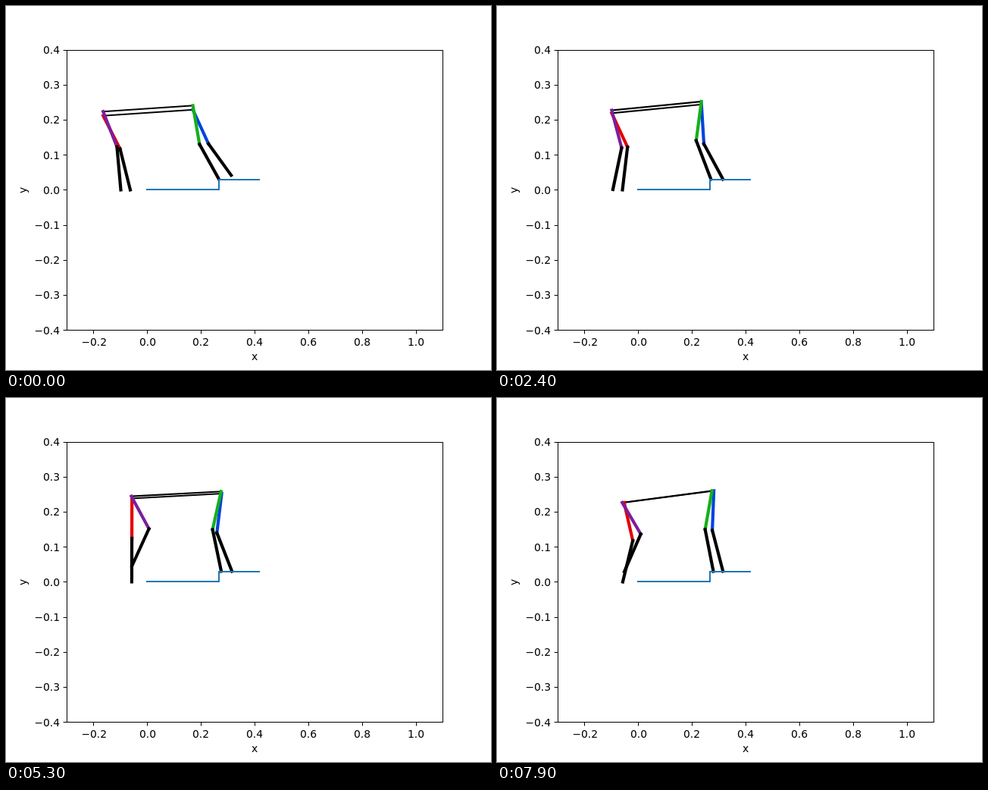
An HTML page with a canvas for the animation above (8 s loop, 640 by 480 pixels).

```html
<!DOCTYPE html>
<html lang="en">
<head>
<meta charset="utf-8">
<title>Walker on a step</title>
<style>
  html, body { margin: 0; width: 100%; height: 100%; overflow: hidden; background: #fff; }
  canvas { display: block; }
</style>
</head>
<body>
<canvas id="stage" width="640" height="480"></canvas>
<script>
const ctx = document.getElementById('stage').getContext('2d');
const LOOP = 8000, STEP = 100;
const UX = 496 / 1.4, UY = 462;            // pixels per axis unit
const FLOOR = 242.4, LEDGE = 228.5, BODY = 118.4;
const THIGH = 0.1133, SHIN = 0.1233;       // in axis units

const smooth = (a, b, t) => {
  const u = Math.min(1, Math.max(0, (t - a) / (b - a)));
  return u * u * (3 - 2 * u);
};
const label = v => (v < 0 ? '\u2212' : '') + Math.abs(v).toFixed(1);

function line(color, width, ...pts) {
  ctx.strokeStyle = color;
  ctx.lineWidth = width;
  ctx.beginPath();
  pts.forEach(p => ctx.lineTo(p[0], p[1]));
  ctx.stroke();
}

// Two-link leg: side is 1 for a knee bent to the right, -1 to the left.
function kneeAt(hip, foot, side) {
  const dx = (foot[0] - hip[0]) / UX, dy = (foot[1] - hip[1]) / UY;
  const d = Math.hypot(dx, dy), ux = dx / d, uy = dy / d;
  const along = (THIGH ** 2 - SHIN ** 2 + d * d) / (2 * d);
  const out = side * Math.sqrt(Math.max(0, THIGH ** 2 - along ** 2));
  return [hip[0] + (along * ux + out * uy) * UX, hip[1] + (along * uy - out * ux) * UY];
}

function drawLeg(color, hip, foot, side) {
  const knee = kneeAt(hip, foot, side);
  line(color, 4.17, hip, knee);
  line('#000', 4.17, knee, foot);
}

// Right-aligned number, snapped to whole pixels.
function tickText(v, right, base) {
  ctx.textAlign = 'right';
  ctx.fillText(label(v), Math.round(right + 0.25) + 0.1, Math.round(base));
}

function drawAxes() {
  ctx.fillStyle = '#000';
  ctx.font = '13.89px "DejaVu Sans", sans-serif';
  ctx.lineCap = 'butt';
  for (let i = -1; i <= 5; i++) {
    const x = 80 + (i * 0.2 + 0.3) * UX, sx = Math.round(x) + 0.5;
    line('#000', 1, [sx, 427.5], [sx, 432.4]);
    tickText(i / 5, x + ctx.measureText(label(i / 5)).width / 2, 448);
  }
  for (let i = -4; i <= 4; i++) {
    const y = FLOOR - i * 0.1 * UY, sy = Math.round(y) + 0.5;
    line('#000', 1, [75.6, sy], [80.5, sy]);
    tickText(i / 10, 70.3, y + 5.4);
  }
  ctx.textAlign = 'center';
  ctx.fillText('x', 328, 467);
  ctx.save();
  ctx.translate(27, 243);
  ctx.rotate(-Math.PI / 2);
  ctx.fillText('y', 0, 0);
  ctx.restore();
  ctx.strokeStyle = '#000';
  ctx.lineWidth = 1;
  ctx.strokeRect(80.5, 58.5, 496, 369);
}

function drawWalker(t) {
  // The body slows down as it moves on; its rear rises and sinks, its front settles.
  const x = 128.2 + t * (11.8 - 0.9 * t);
  const rearY = 139.2 - 9.7 * Math.exp(-(((t - 5.05) / 2) ** 2));
  const frontY = 121.6 + 9.7 * Math.exp(-t / 3);
  // Roll and yaw part the two sides.
  const gapX = 2.5 * (t / 7.9) ** 3;
  const gapY = (3.8 + 1.7 * Math.exp(-2 * t)) * (1 - smooth(4, 8, t));

  const purple = [x, rearY], green = [x + BODY, frontY];
  const red = [x + gapX, rearY + gapY], blue = [x + BODY + gapX, frontY + gapY];

  const landing = 5.3 * (1 - smooth(0, 0.8, t));
  const blueFoot = [298.2 - 0.2 * landing, LEDGE - landing];
  const greenFoot = [281 + 0.57 * t, LEDGE];
  const redFoot = [164 + 0.65 * Math.min(t, 3), FLOOR];
  const purpleFoot = [
    151.5 + 0.25 * Math.min(t, 4.5) ** 2 + 11.5 * smooth(4.4, 5.6, t),
    FLOOR - 24 * smooth(2.2, 4.7, t) + 10.5 * smooth(4.6, 6.6, t)
  ];

  line('#000', 2.08, purple, green);
  line('#000', 2.08, red, blue);
  drawLeg('#0343df', blue, blueFoot, -1);
  drawLeg('#15b01a', green, greenFoot, -1);
  drawLeg('#e50000', red, redFoot, 1);
  drawLeg('#7e1e9c', purple, purpleFoot, 1);
}

function draw(t) {
  ctx.fillStyle = '#fff';
  ctx.fillRect(0, 0, 640, 480);
  drawAxes();
  ctx.lineCap = 'square';
  drawWalker(t);
  line('#1f77b4', 2, [186, 242], [281, 242], [281, 229], [334, 229]);
}

const start = performance.now();
function tick() {
  const ms = Math.max(0, performance.now() - start) % LOOP;
  draw(Math.floor(ms / STEP) * STEP / 1000);
  requestAnimationFrame(tick);
}
tick();
</script>
</body>
</html>
```
